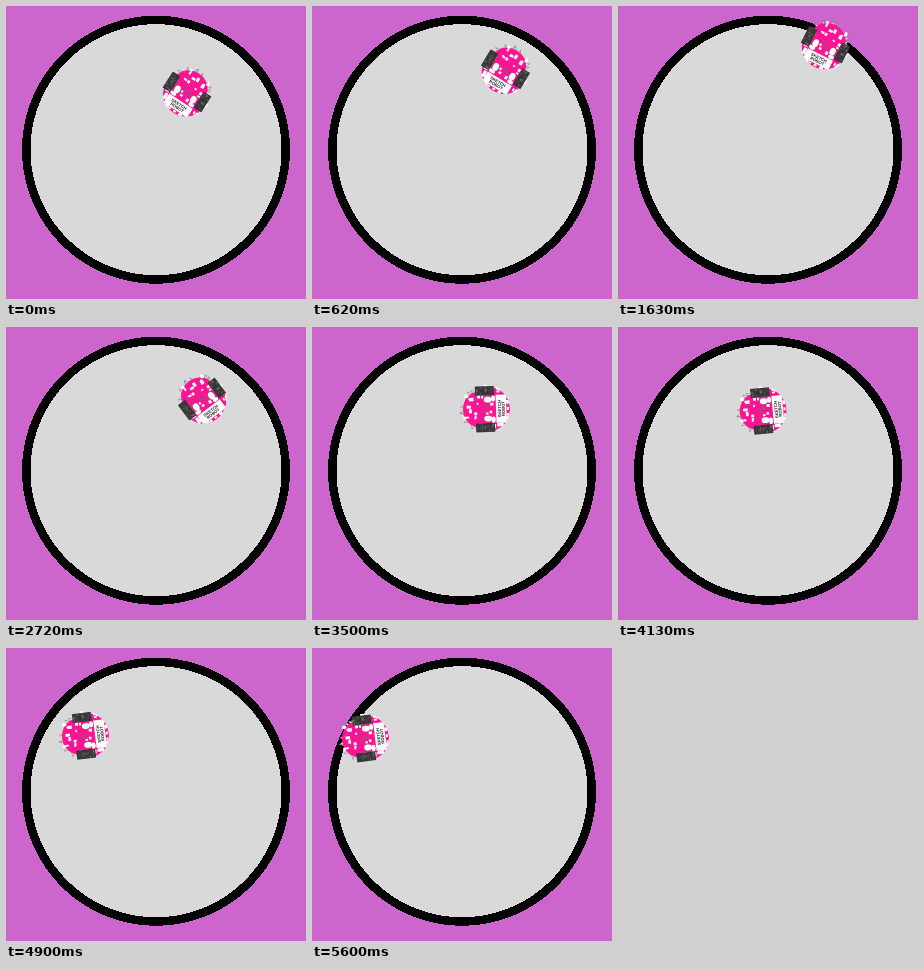
Write an HTML page with a canvas that moves like this. It is 300 px wide and 293 px high and loops after 5670 ms.

```html
<!DOCTYPE html>
<html lang="en">
<head>
<meta charset="utf-8">
<title>Robot in a ring</title>
<style>
html, body { margin: 0; width: 100%; height: 100%; overflow: hidden; background: #cc66cc; }
canvas { display: block; }
</style>
</head>
<body>
<canvas id="stage" width="300" height="293"></canvas>
<script>
const ctx = document.getElementById('stage').getContext('2d');
const LOOP = 5670, TICKS = 73;
const PINK = '#ff1493';

// Drive up, back off while turning, then drive left: tick, x, y, heading
const path = [
  [0, 181, 86, 33], [16, 206, 40.5, 29], [21, 207.5, 38.7, 27],
  [28, 199.5, 56.5, 8], [35, 196, 72, -37], [41, 198.5, 80, -65],
  [45, 173, 82.2, -92], [54, 140, 84.2, -96], [63, 78, 87.8, -97], [70, 52, 90.4, -97]
];
// The slow turn holds its picture between these ticks.
const holds = [21, 24, 28, 32, 35, 41, 45, 47];

function tickAt(t) {
  const n = Math.min(TICKS - 1, Math.floor(t / LOOP * TICKS + 0.12));
  return n > 21 && n < 47 ? holds.filter(h => h <= n).pop() : n;
}

function pose(n) {
  const i = Math.max(1, path.findIndex(p => p[0] >= n));
  if (n > path.at(-1)[0]) return path.at(-1);
  const a = path[i - 1], b = path[i];
  const k = (n - a[0]) / (b[0] - a[0]);
  return a.map((v, j) => v + (b[j] - v) * k);
}

function random(seed) {
  return () => (seed = seed * 16807 % 2147483647) / 2147483647;
}

function disc(x, y, rx, ry, color) {
  ctx.fillStyle = color;
  ctx.beginPath();
  ctx.ellipse(x, y, rx, ry, 0, 0, 7);
  ctx.fill();
}

function box(x, y, w, h, color) {
  ctx.fillStyle = color;
  ctx.fillRect(x, y, w, h);
}

// disc with crisp pixel edges
function hardDisc(cx, cy, r, color) {
  for (let y = Math.floor(cy - r); y < cy + r; y++) {
    const half = Math.sqrt(Math.max(0, r * r - (y + 0.5 - cy) ** 2));
    const left = Math.round(cx - half);
    box(left, y, Math.round(cx + half) - left, 1, color);
  }
}

function spikes(rnd) {
  ctx.lineWidth = 0.5;
  ctx.strokeStyle = '#666';
  ctx.fillStyle = '#fff';
  for (let i = 0; i < 9; i++) {
    const a = -2.7 + i * 0.27 + rnd() * 0.1;
    const r = 23 + rnd() * 3, lean = (rnd() - 0.5) * 0.35;
    ctx.beginPath();
    ctx.moveTo(Math.cos(a - 0.12) * 18, Math.sin(a - 0.12) * 18);
    ctx.lineTo(Math.cos(a + lean) * r, Math.sin(a + lean) * r);
    ctx.lineTo(Math.cos(a + 0.1) * 19, Math.sin(a + 0.1) * 19);
    ctx.fill();
    ctx.stroke();
  }
}

// ragged white paint flecks in a band around the middle
function flecks(rnd, count, near, far, size) {
  for (let i = 0; i < count; i++) {
    const a = rnd() * 6.28, r = near + rnd() * (far - near);
    box(Math.cos(a) * r, Math.sin(a) * r, size * (0.5 + rnd()), size * (0.5 + rnd()), '#fff');
  }
}

function wheel(side, rnd) {
  box(side * 18.5 - 4.5, -9.5, 9, 19, '#383838');
  for (let i = 0; i < 22; i++) {
    const shade = 35 + rnd() * 95;
    box(side * 18.5 - 4 + rnd() * 6, -9 + rnd() * 17, 2.2, 0.8, `rgb(${shade},${shade},${shade})`);
  }
  disc(side * 9.5, 3, 3.4, 4.4, '#777');
  disc(side * 9.5, 3, 2.9, 3.9, '#fff');
  disc(side * 10.5, 8.5, 3, 2, '#fff');
}

function label() {
  box(-14, 11, 28, 10.5, '#fff');
  ctx.fillStyle = '#222';
  ctx.textAlign = 'center';
  ctx.font = 'bold 4.2px "Liberation Sans", sans-serif';
  ctx.fillText('SKETCH', 0, 16);
  ctx.fillText('ROBOT', 0, 19.8);
}

function robot() {
  const rnd = random(23);
  spikes(rnd);
  ctx.beginPath();
  ctx.arc(0, 0, 25, 0, 7);
  ctx.clip();
  disc(0, 4, 22, 21, PINK);
  disc(0, -6, 18, 16, PINK);
  flecks(rnd, 34, 16, 24, 3);
  flecks(rnd, 14, 5, 16, 2.2);
  wheel(-1, rnd);
  wheel(1, rnd);
  disc(-1, -1, 1.8, 1.1, '#68706f');
  disc(2, 2, 1, 1.6, '#68706f');
  label();
  for (let x = -12; x <= 12; x += 6) box(x - 1.5, 22, 3, 2, '#fff');
}

function draw(now) {
  const [, x, y, angle] = pose(tickAt(now % LOOP));
  box(0, 0, 300, 293, '#cc66cc');
  hardDisc(150, 143.7, 134, '#000');
  hardDisc(150, 143.7, 125.5, '#d9d9d9');
  ctx.save();
  ctx.translate(x, y);
  ctx.rotate(angle * Math.PI / 180);
  robot();
  ctx.restore();
}

let start;
function frame(now) {
  start ??= now;
  draw(Math.max(0, now - start));
  requestAnimationFrame(frame);
}
draw(0);
requestAnimationFrame(frame);
</script>
</body>
</html>
```
